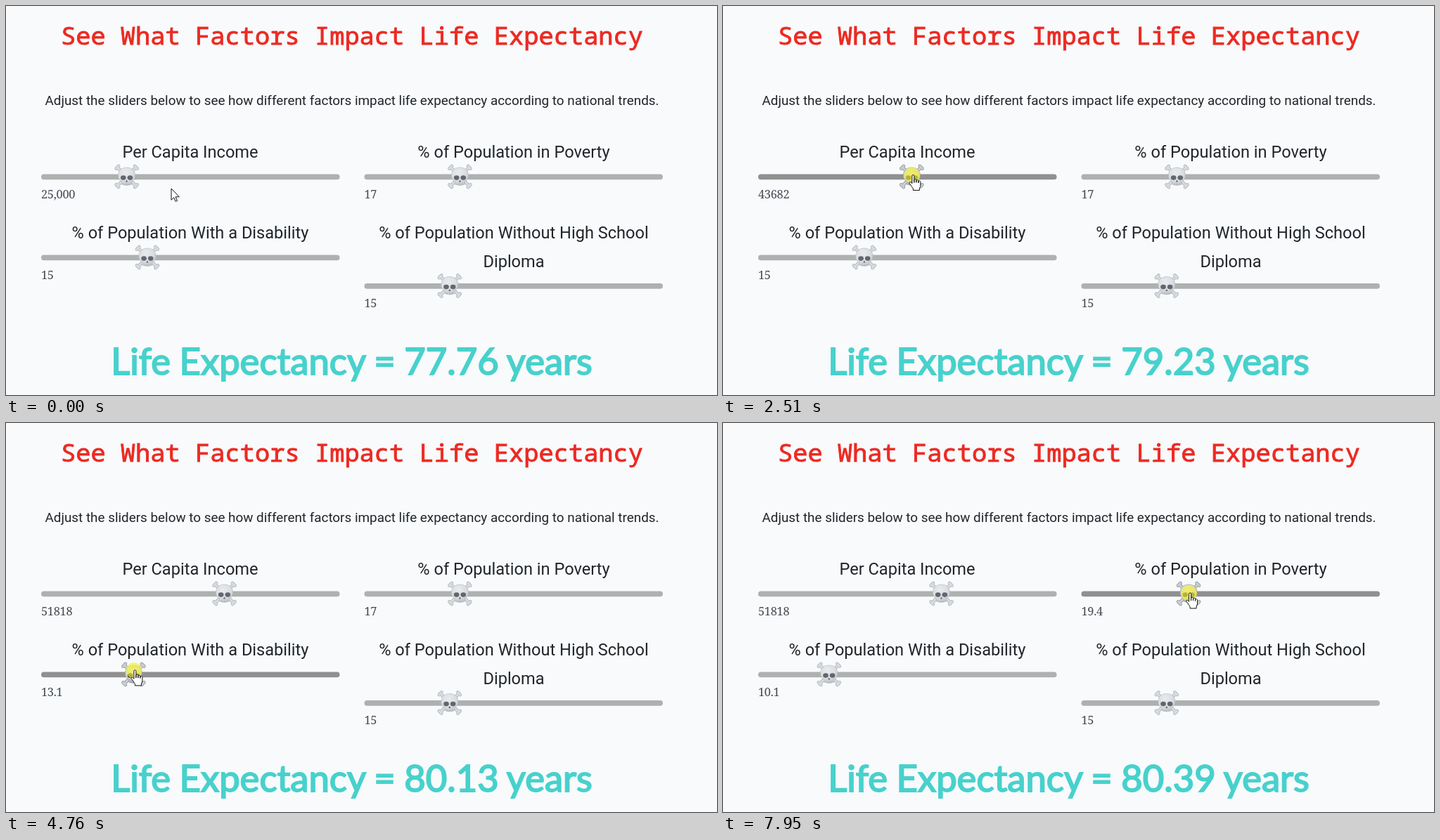
These frames come from a looping animation (1011 by 554 pixels, 8000 ms). An HTML page:

```html
<!DOCTYPE html>
<html lang="en">
<head>
<meta charset="utf-8">
<title>Life expectancy sliders</title>
<style>
  html, body { margin: 0; height: 100%; overflow: hidden; background: #f8fafc; }
  svg { display: block; width: 100vw; height: 100vh; }
  text { fill: #212529; font-family: Roboto, sans-serif; text-anchor: middle; }
  .title { font: 400 35.4px "Roboto Mono", "Noto Sans Mono", monospace; fill: #ec2a22; stroke: #ec2a22; stroke-width: .9; }
  .intro { font-size: 18.87px; }
  .label { font-size: 23.6px; }
  .value { font: 16.4px "Roboto Slab", "Noto Serif", serif; fill: #444a50; text-anchor: start; letter-spacing: -.3px; }
  .result { font: 52.6px Lato, sans-serif; word-spacing: -1px; fill: #48d1cc; stroke: #48d1cc; stroke-width: 1.9; }
</style>
</head>
<body>
<svg viewBox="0 0 1011 554">
  <defs>
    <radialGradient id="bone" cx=".42" cy=".3" r=".75">
      <stop offset="0" stop-color="#e2e4e8"/>
      <stop offset=".6" stop-color="#cdd0d5"/>
      <stop offset="1" stop-color="#a0a4aa"/>
    </radialGradient>
    <path id="bones" fill="none" stroke-linecap="round"
      d="M-12 -12L12 12M12 -12L-12 12M-15 -11.5L-11.5 -15M15 -11.5L11.5 -15M-15 11.5L-11.5 15M15 11.5L11.5 15"/>
    <g id="skull">
      <use href="#bones" stroke="#969ba1" stroke-width="4.6"/>
      <use href="#bones" stroke="#cbced2" stroke-width="3"/>
      <path fill="url(#bone)" stroke="#969ba1" stroke-width=".6"
        d="M0 -13C8 -13 12 -8 12 -2C12 2 11 4 9 5.5L7 7V11Q0 14 -7 11V7L-9 5.5C-11 4 -12 2 -12 -2C-12 -8 -8 -13 0 -13Z"/>
      <g fill="#1f2732">
        <ellipse cx="-4.8" cy="1.6" rx="3.8" ry="3.3"/>
        <ellipse cx="4.8" cy="1.6" rx="3.8" ry="3.3"/>
        <path d="M0 4.5L1.7 7.5H-1.7Z"/>
      </g>
      <path d="M-3.5 9.5V12M0 9.5V12.5M3.5 9.5V12" stroke="#8b9097" stroke-width=".8"/>
    </g>
  </defs>

  <text class="title" x="492" y="55">See What Factors Impact Life Expectancy</text>
  <text class="intro" x="492" y="141.3">Adjust the sliders below to see how different factors impact life expectancy according to national trends.</text>
  <text class="label" x="262" y="216">Per Capita Income</text>
  <text class="label" x="722" y="216">% of Population in Poverty</text>
  <text class="label" x="262" y="331">% of Population With a Disability</text>
  <text class="label" x="722" y="331">% of Population Without High School</text>
  <text class="label" x="722" y="371.5">Diploma</text>
  <g id="sliders"></g>
  <text class="result" id="result" x="491.5" y="525"></text>
  <circle id="halo" r="11.2" fill="#f4ef3c" opacity=".7"/>
  <g fill="#fff" stroke="#111" stroke-linejoin="round">
    <path id="arrow" d="M0 0V16.2L3.8 12.8L6.2 18.4L8.5 17.4L6.1 11.8H11.3Z"/>
    <path id="hand" d="M-1.5 12.3V1.5Q-1.5 0 0 0Q1.5 0 1.5 1.5V11V7Q1.8 6 3.2 6.2Q4.5 6.4 4.5 7.8V11V7.8Q5 7 6.3 7.3Q7.5 7.6 7.5 8.8V11.5V8.8Q8.2 8.2 9.3 8.6Q10.5 9 10.5 10.5V15Q10.5 17 9 19V22H0V19.5Q-2 17 -3 15L-5 12.5Q-6 11 -5 10.3Q-4 9.7 -2.8 11Z"/>
  </g>
</svg>
<script>
const LOOP = 8000, THUMB = 36, WIDTH = 424.5;
const $ = id => document.getElementById(id);

// keys: [time, value]; hover and press: [from, to]; lift: how far the hand rises during the drag
const sliders = {
  income: {
    x: 50, y: 243, min: 5000, max: 80000, hover: [70, 3900], press: [1040, 3640], grip: 1, lift: 15,
    keys: [[1040, 25000], [1360, 30000], [2060, 37634], [3050, 50909], [3500, 51818]],
    format: v => v === 25000 ? '25,000' : Math.round(v)
  },
  poverty: {
    x: 509.5, y: 243, min: 0, max: 56, hover: [7400, LOOP * 2], press: [7740, LOOP], grip: -1, lift: 0,
    keys: [[7740, 17], [7950, 19.4]]
  },
  disability: {
    x: 50, y: 358, min: 2, max: 40, hover: [4160, 6070], press: [4440, 5540], grip: -6, lift: 1,
    keys: [[4440, 15], [4760, 13.1], [5380, 10.1]]
  },
  diploma: { x: 509.5, y: 398.5, min: 0, max: 56.4, hover: [LOOP, LOOP], press: [LOOP, LOOP], keys: [[0, 15]] }
};
const all = Object.values(sliders);

// Free moves of the pointer; while a thumb is held the pointer rides on it.
const roam = [
  [60, 235, 260], [280, 179, 246], [1040, 175, 245],
  [3640, 312, 229], [4200, 202, 352], [5540, 152, 351],
  [5930, 160, 356], [6540, 298.5, 305], [6900, 445, 310],
  [7140, 540, 368], [7500, 647, 242]
];

const within = (t, [from, to]) => t >= from && t < to;
const clamp = v => Math.max(0, Math.min(1, v));

function at(keys, t, i = 1) {
  const n = keys.findIndex(k => k[0] > t);
  if (n === 0) return keys[0][i];
  if (n < 0) return keys.at(-1)[i];
  const a = keys[n - 1], b = keys[n];
  return a[i] + (b[i] - a[i]) * (t - a[0]) / (b[0] - a[0]);
}

for (const s of all) {
  $('sliders').insertAdjacentHTML('beforeend',
    `<g><rect x="${s.x}" y="${s.y - 3.4}" width="${WIDTH}" height="7.6" rx="3.8" fill="#909090"/><use href="#skull"/></g>
     <text class="value" x="${s.x}" y="${s.y + 30.5}"></text>`);
  s.text = $('sliders').lastElementChild;
  s.group = s.text.previousElementSibling;
  s.thumb = s.group.lastElementChild;
}

function place(el, x, y, shown = true) {
  el.setAttribute('transform', `translate(${x} ${y})`);
  el.style.display = shown ? '' : 'none';
}

function draw(t) {
  for (const s of all) {
    s.value = at(s.keys, t);
    s.pos = s.x + THUMB / 2 + (s.value - s.min) / (s.max - s.min) * (WIDTH - THUMB);
    const lit = clamp((t - s.hover[0]) / 200) - clamp((t - s.hover[1]) / 200);
    s.group.setAttribute('opacity', 0.7 + 0.3 * lit);
    place(s.thumb, s.pos, s.y);
    s.text.textContent = s.format ? s.format(s.value) : +s.value.toFixed(1);
  }

  const { income, poverty, disability } = sliders;
  const years = income.value === 25000 ? 77.76
    : 78.243 + (income.value - 30000) * 0.0000724
      + (15 - disability.value) * 0.1632 - (poverty.value - 17) * 0.0958;
  $('result').textContent = `Life Expectancy = ${years.toFixed(2)} years`;

  const held = all.find(s => within(t, s.press));
  let x = at(roam, t), y = at(roam, t, 2);
  if (held) {
    const first = held.keys[0][1], last = held.keys.at(-1)[1];
    x = held.pos + 2;
    y = held.y + held.grip - held.lift * ((held.value - first) / (last - first)) ** 4;
  }
  const over = all.some(s => within(t, s.hover));
  place($('arrow'), x, y, !over);
  place($('hand'), x, y, over);
  place($('halo'), x - 1.5, y + 0.5, !!held);
}

const start = performance.now();
function frame() {
  draw((performance.now() - start) % LOOP);
  requestAnimationFrame(frame);
}
frame();
</script>
</body>
</html>
```
